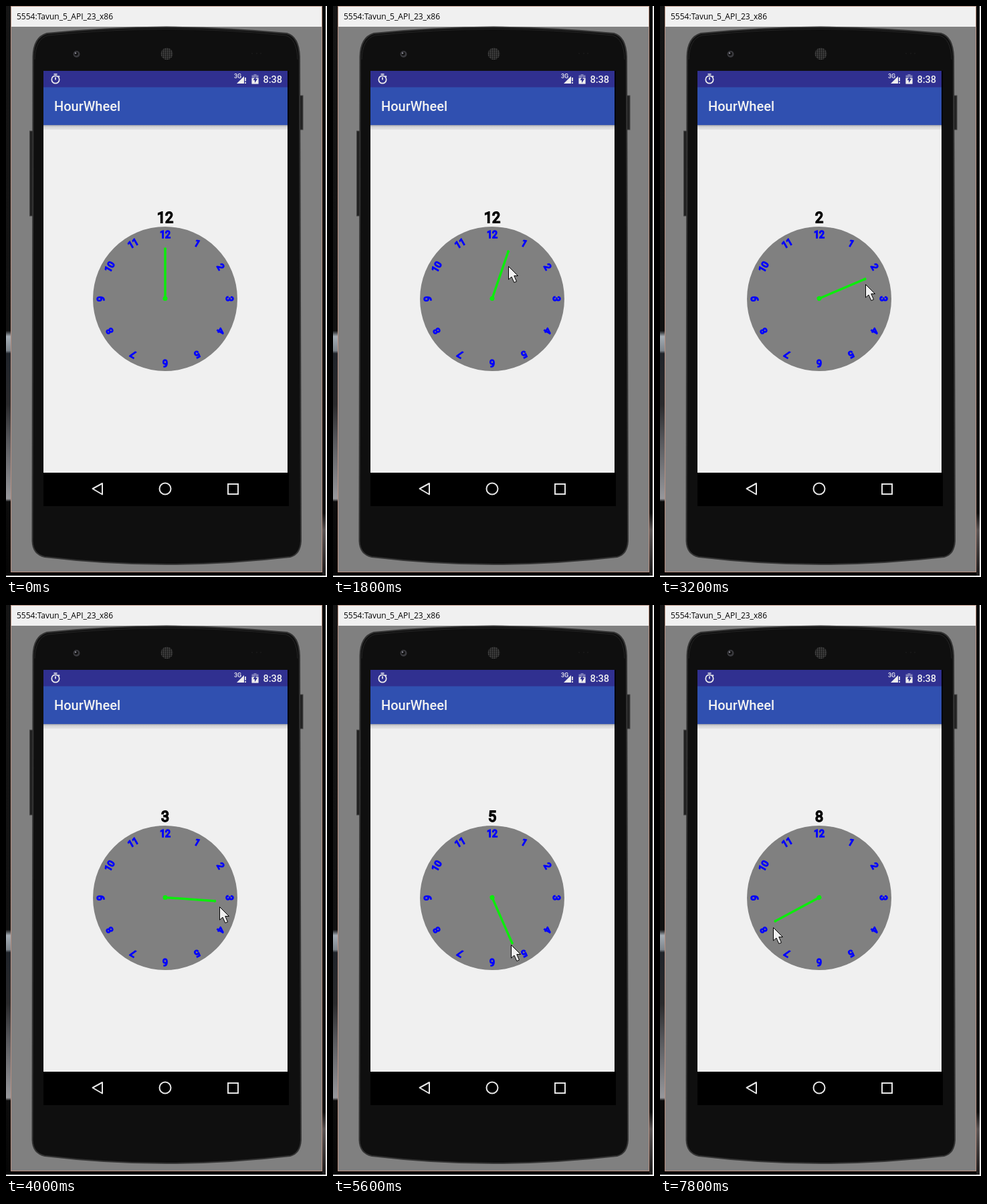
These frames come from a looping animation (480 px wide and 854 px high, 8 s). An HTML page:

```html
<!DOCTYPE html>
<html lang="en">
<head>
<meta charset="utf-8">
<title>Clock hand</title>
<style>
  html, body { margin: 0; width: 100%; height: 100%; overflow: hidden; background: #fff; }
  svg { display: block; width: 480px; height: 854px; }
  .ui { font-family: Roboto, sans-serif; font-weight: 500; fill: #f2f2f2; }
  .window-title { font: 12px "Open Sans", "Noto Sans", sans-serif; fill: #000; }
  .dial text { font: 14px Roboto, sans-serif; fill: #00f; stroke: #00f; stroke-width: 1.6; text-anchor: middle; }
  #hour { font: 21.5px Roboto, sans-serif; fill: #333; stroke: #000; stroke-width: 1.8; text-anchor: middle; }
  .nav { fill: none; stroke: #e6e6e6; stroke-width: 2; }
</style>
</head>
<body>
<svg viewBox="0 0 480 854">
  <defs>
    <linearGradient id="leftGlow" x2="0" y2="1">
      <stop offset="0" stop-color="#151515"/>
      <stop offset=".57" stop-color="#111"/>
      <stop offset=".58" stop-color="#a4adb5"/>
      <stop offset=".605" stop-color="#7d858c"/>
      <stop offset=".61" stop-color="#20242a"/>
      <stop offset=".7" stop-color="#2a2a2c"/>
      <stop offset=".76" stop-color="#55565a"/>
      <stop offset=".865" stop-color="#97989c"/>
      <stop offset=".87" stop-color="#0c0c0c"/>
      <stop offset="1" stop-color="#050505"/>
    </linearGradient>
    <linearGradient id="rightGlow" x2="0" y2="1">
      <stop offset="0" stop-color="#080808"/>
      <stop offset=".89" stop-color="#101010"/>
      <stop offset=".92" stop-color="#5b5555"/>
      <stop offset="1" stop-color="#1c1a1a"/>
    </linearGradient>
    <linearGradient id="shade" x2="0" y2="1">
      <stop offset="0" stop-color="#9a9da8"/>
      <stop offset=".35" stop-color="#d2d2d4"/>
      <stop offset="1" stop-color="#e6e6e6"/>
    </linearGradient>
    <pattern id="mesh" width="3" height="3" patternUnits="userSpaceOnUse">
      <rect width="3" height="3" fill="#1a1a1a"/>
      <circle cx="1.5" cy="1.5" r="1" fill="#555"/>
    </pattern>
  </defs>

  <!-- desktop and window -->
  <rect width="478" height="852" fill="#060606"/>
  <rect width="7" height="852" fill="url(#leftGlow)"/>
  <rect x="473" width="5" height="852" fill="url(#rightGlow)"/>
  <rect x="7.5" y=".5" width="465" height="846" fill="#808080" stroke="#b78f80"/>
  <rect x="8" y="1" width="464" height="30" fill="#f0f0f0"/>
  <text class="window-title" x="16" y="20">5554:Tavun_5_API_23_x86</text>

  <!-- phone body -->
  <rect x="35.5" y="187" width="6" height="127" fill="#222" stroke="#444"/>
  <rect x="438" y="134" width="6" height="51" fill="#222" stroke="#444"/>
  <path d="M40.5 76Q41 47 61 41Q150 32 240 31.500Q330 32 420 41Q438 46 439 76L441 800Q440 820 425 824Q330 835 240 835Q150 835 58 824Q40 820 39.500 800Z" fill="#0f0f0f" stroke="#343434" stroke-width="2"/>
  <path d="M43 80Q44 49 63 44Q150 35 240 34.500Q330 35 418 44Q435 49 436 80" fill="none" stroke="#242424"/>
  <circle cx="105.500" cy="72" r="5" fill="#3a3a3e"/>
  <circle cx="105" cy="71.500" r="2.800" fill="#111"/>
  <circle cx="104" cy="70.500" r="1.200" fill="#8c8c98"/>
  <circle cx="240.500" cy="71.500" r="9" fill="url(#mesh)"/>
  <path d="M367 71h2M374 71h2M380 71h2" stroke="#1e1e1e"/>

  <!-- screen -->
  <rect x="56" y="97" width="367" height="651" fill="#000"/>
  <rect x="56" y="97" width="365" height="25" fill="#303090"/>
  <rect x="56" y="121.500" width="365" height="56.500" fill="#3050b0"/>
  <rect x="56" y="178" width="365" height="520" fill="#f0f0f0"/>
  <rect x="56" y="178" width="365" height="7" fill="url(#shade)"/>
  <text class="ui" x="72" y="157" font-size="20">HourWheel</text>

  <!-- status icons -->
  <g fill="none" stroke="#eee" stroke-width="1.700">
    <circle cx="74" cy="110" r="5.700"/>
    <path d="M71.500 102h5M74 106.500v4M78.500 104.500l1.500 1.500"/>
  </g>
  <text class="ui" x="341" y="108" font-size="9" font-weight="700">3G</text>
  <path d="M345 116L356 105V116Z" fill="#eee"/>
  <path d="M358 107v5.500M358 114v2" stroke="#eee" stroke-width="1.800"/>
  <path d="M367.500 103.500h3v-1.500h4v1.500h3v13h-10z" fill="#7c7cb8"/>
  <path d="M367.500 108h10v8.500h-10z" fill="#eee"/>
  <path d="M373.500 105l-4 6h2.500v4l4-6h-2.500z" fill="#303090"/>
  <text class="ui" x="384.500" y="114.500" font-size="14.500">8:38</text>

  <!-- navigation -->
  <g class="nav">
    <path d="M129.500 722L144 714V730.500Z" stroke-linejoin="round"/>
    <circle cx="238" cy="722" r="8.500"/>
    <rect x="332" y="715" width="15" height="15"/>
  </g>

  <!-- clock -->
  <text id="hour" x="238" y="323.500">12</text>
  <g class="dial" id="dial"><circle cx="238" cy="438" r="108" fill="#808080"/></g>
  <g id="hand" fill="#0cec0c" stroke="#0cec0c">
    <path d="M238 437.500V362.500" stroke-width="3.500"/>
    <circle cx="238" cy="437.500" r="3.500" stroke="none"/>
    <circle cx="238" cy="363" r="2" stroke="none"/>
  </g>
  <path id="cursor" d="M.5.5V20L5 16L8.800 24.500L12.500 23L8.800 14.500H14.500Z" fill="#f0f0f0" stroke="#000"/>
</svg>
<script>
  const LOOP = 8000, STEP = 200;
  // time, cursor x, cursor y, hand angle
  const path = [
    [200, 57, 387, 0], [1000, 244, 387, 0], [1200, 245, 387, 0],
    [1400, 250, 387, 7], [2400, 281, 392, 36.8], [3200, 307, 416, 67],
    [3600, 317, 434, 82], [4200, 320, 460, 100], [4800, 308, 484, 120.3],
    [5400, 281, 504, 144], [6000, 237, 515, 181], [6600, 222, 515, 193],
    [7200, 183, 498, 226], [7800, 169, 482, 241.7]
  ];
  const get = id => document.getElementById(id);
  const hour = get('hour'), hand = get('hand'), cursor = get('cursor'), dial = get('dial');

  for (let n = 1; n <= 12; n++) {
    const label = document.createElementNS(dial.namespaceURI, 'text');
    label.setAttribute('x', 238);
    label.setAttribute('y', 347);
    label.setAttribute('transform', `rotate(${n * 30} 238 438)`);
    label.textContent = n;
    dial.append(label);
  }

  function pose(time) {
    const next = path.findIndex(key => key[0] >= time);
    if (next <= 0) return path[0];
    const a = path[next - 1], b = path[next];
    const k = (time - a[0]) / (b[0] - a[0]);
    return a.map((v, i) => v + (b[i] - v) * k);
  }

  function draw(now) {
    const time = Math.floor((now % LOOP) / STEP) * STEP;
    const [, x, y, angle] = pose(time);
    cursor.setAttribute('visibility', time < path[0][0] ? 'hidden' : 'visible');
    cursor.setAttribute('transform', `translate(${Math.round(x)} ${Math.round(y)})`);
    hand.setAttribute('transform', `rotate(${angle} 238 437.5)`);
    hour.textContent = Math.floor(angle / 30) || 12;
    requestAnimationFrame(draw);
  }
  draw(0);
</script>
</body>
</html>
```
